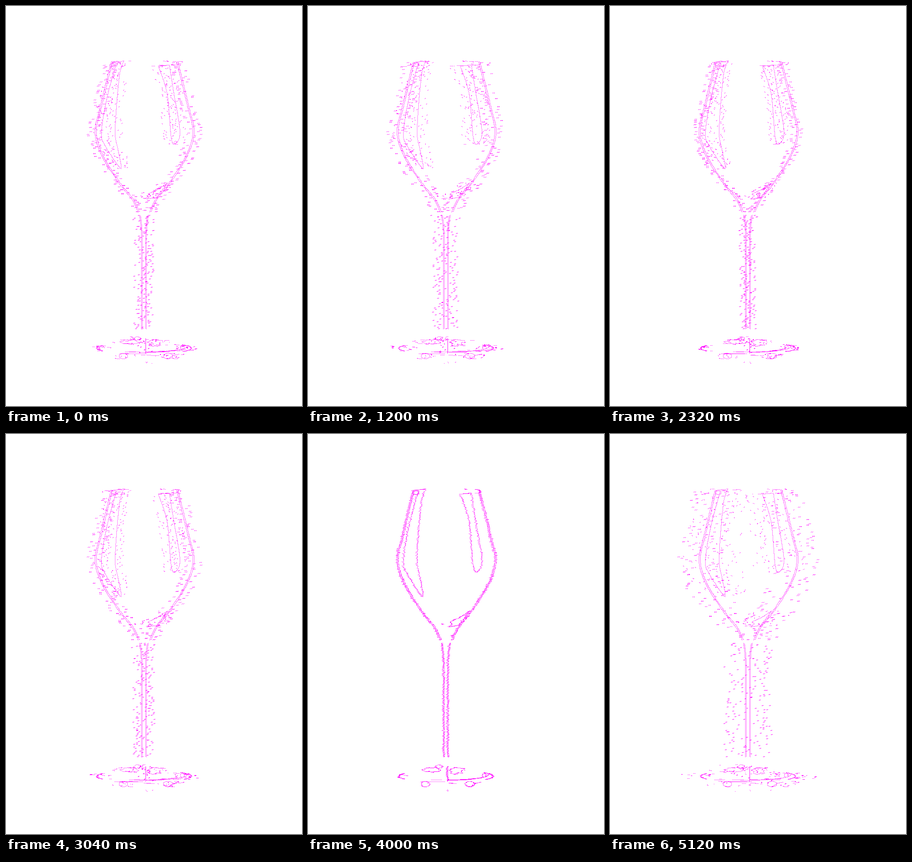
These frames come from a looping animation (644 px wide and 869 px high, 5.2 s). An HTML page with a canvas:

```html
<!DOCTYPE html>
<html lang="en">
<head>
<meta charset="utf-8">
<title>Shimmering glass</title>
<style>
html, body { margin: 0; width: 100%; height: 100%; overflow: hidden; background: #fff; }
canvas { display: block; width: 644px; height: 869px; }
</style>
</head>
<body>
<canvas id="stage" width="644" height="869"></canvas>
<script>
const STEP = 80, STEPS = 65;
const ctx = document.getElementById('stage').getContext('2d');

function randomFrom(seed) {
  return () => {
    seed = seed + 0x6D2B79F5 | 0;
    let t = Math.imul(seed ^ seed >>> 15, 1 | seed);
    t = t + Math.imul(t ^ t >>> 7, 61 | t) ^ t;
    return ((t ^ t >>> 14) >>> 0) / 4294967296;
  };
}

const points = text => text.split(' ').map(p => p.split(',').map(Number));
const mirror = (pts, sum) => pts.map(([x, y]) => [sum - x, y]);

function curve(pts) {
  const spline = (a, b, c, d, t) =>
    b + t / 2 * (c - a + t * (2 * a - 5 * b + 4 * c - d + t * (3 * (b - c) + d - a)));
  const out = [];
  for (let i = 0; i < pts.length - 1; i++) {
    const b = pts[i], c = pts[i + 1], a = pts[i - 1] || b, d = pts[i + 2] || c;
    for (let t = 0; t < 1; t += 0.05) {
      out.push([0, 1].map(n => spline(a[n], b[n], c[n], d[n], t)));
    }
  }
  return [...out, pts[pts.length - 1]];
}

// Elliptic arc, angles in turns; rough > 0 gives a ragged outline.
function arc(cx, cy, rx, ry, from = 0, to = 1, rough = 0) {
  const random = randomFrom(cx * 31 + cy);
  const count = rough ? 16 : 40;
  return Array.from({ length: count + 1 }, (_, i) => {
    const angle = 2 * Math.PI * (from + (to - from) * i / count);
    const r = 1 - rough * random();
    return [cx + rx * r * Math.cos(angle), cy + ry * r * Math.sin(angle)];
  });
}

const blob = (cx, cy, rx, ry) => arc(cx, cy, rx, ry, 0, 1, 0.5);

const side = curve(points('228,122 204,220 193,274 208,325 245,384 274,420 287,447'));
const stem = curve(points('290,454 293,480 294,520 294,701'));
const leftShine = curve(points('256,119 246,153 237,268 243,310 250,346 246,349 215,303 207,274 219,200 239,126'));
const rightShine = curve(points('355,128 364,185 378,272 368,299 359,285 350,190 331,130'));
const shard = points('351,384 330,398 308,408 314,412 306,419 328,415 336,404 351,384');

// Pairs: path, gap to its parallel twin (0 = single line).
const contours = [
  [side, 3], [mirror(side, 602), -3],
  [stem, 2], [mirror(stem, 599), -2],
  [leftShine, 0], [rightShine, 0], [shard, 0],
  [points('228,122 256,119'), 0],
  [points('331,130 355,128'), 0],
  [arc(235, 127, 6, 4), 0],
  [arc(366, 124, 9, 4, -0.3, 0.3), 0],
  [points('342,119 347,120'), 0],
  [points('292,412 296,413'), 0],
  [arc(314, 438, 2, 1), 0],
  [arc(300, 743, 104, 13, 0.42, 0.58), 2],
  [arc(300, 743, 104, 13, -0.1, 0.09), -2],
  [arc(300, 739, 94, 13, 0, 0.24), 0],
  [arc(305, 738, 90, 13, 0.12, 0.25), 0],
  [arc(383, 741, 4, 4), 0],
  [points('203,739 215,742'), 0],
  [points('303,722 303,754'), 1],
  [points('268,751 291,751'), 0],
  [blob(270, 729, 24, 7), 0],
  [blob(285, 722, 9, 4), 0],
  [blob(324, 730, 18, 10), 0],
  [arc(255, 760, 9, 6), 0],
  [points('247,755 297,755'), 0],
  [arc(352, 760, 10, 6), 0],
  [points('352,766 362,759 376,756'), 0],
  [points('306,758 323,759'), 0],
  [points('304,773 305,776'), 0]
].map(toRuns);

// Walks a path and collects its pixels as runs of equal height.
function toRuns([pts, gap]) {
  const runs = [];
  let lastX, lastY;
  for (let i = 0; i < pts.length - 1; i++) {
    const [x0, y0] = pts[i], [x1, y1] = pts[i + 1];
    const count = Math.ceil(2 * Math.hypot(x1 - x0, y1 - y0));
    for (let k = 0; k <= count; k++) {
      const x = Math.round(x0 + (x1 - x0) * k / count);
      const y = Math.round(y0 + (y1 - y0) * k / count);
      if (x === lastX && y === lastY) continue;
      if (y !== lastY) runs.push({ y, xs: [] });
      runs[runs.length - 1].xs.push(x);
      [lastX, lastY] = [x, y];
    }
  }
  return { runs, gap };
}

// Scatter reach in pixels at a few steps, eased in between.
const reach = [[0, 17], [13, 25], [21, 14], [29, 13], [38, 19], [50, 2], [65, 49]];

function reachAt(step) {
  const i = reach.findIndex(([s]) => s > step);
  const [s0, a] = reach[i - 1], [s1, b] = reach[i];
  const t = (step - s0) / (s1 - s0);
  return a + (b - a) * t * t * (3 - 2 * t);
}

const dot = (x, y) => ctx.fillRect(x, y, 1, 1);

// Dots alternate between a line and its twin.
function drawLine({ runs, gap }) {
  let n = 0;
  for (const { y, xs } of runs) {
    for (const x of xs) {
      if (n++ % 2 === 0) dot(x, y);
      else if (gap) dot(x + gap, y);
    }
  }
}

// Two of every three rows jump sideways together; flat runs jump as a whole.
function drawScatter({ runs, gap }, amp, random) {
  let shift = 0;
  runs.forEach(({ y, xs }, i) => {
    const row = i % 3, flat = xs.length > 3;
    if (row === 0 || flat) {
      const side = random() < 0.5 ? -1 : 1;
      shift = Math.round(side * amp * random() ** 0.8);
    }
    if (row === 2 && !flat) return;
    xs.forEach((x, k) => {
      if (flat && k % 2) return;
      const px = x + shift - row % 2;
      dot(px, y);
      if (gap) dot(px + gap, y);
    });
  });
}

let shown = -1;
function draw() {
  const step = Math.floor(performance.now() / STEP) % STEPS;
  if (step !== shown) {
    shown = step;
    const random = randomFrom(step * 7919 + 17);
    const amp = reachAt(step);
    ctx.fillStyle = '#fff';
    ctx.fillRect(0, 0, 644, 869);
    ctx.fillStyle = '#f0f';
    for (const contour of contours) {
      drawLine(contour);
      drawScatter(contour, amp, random);
    }
  }
  requestAnimationFrame(draw);
}
draw();
</script>
</body>
</html>
```
